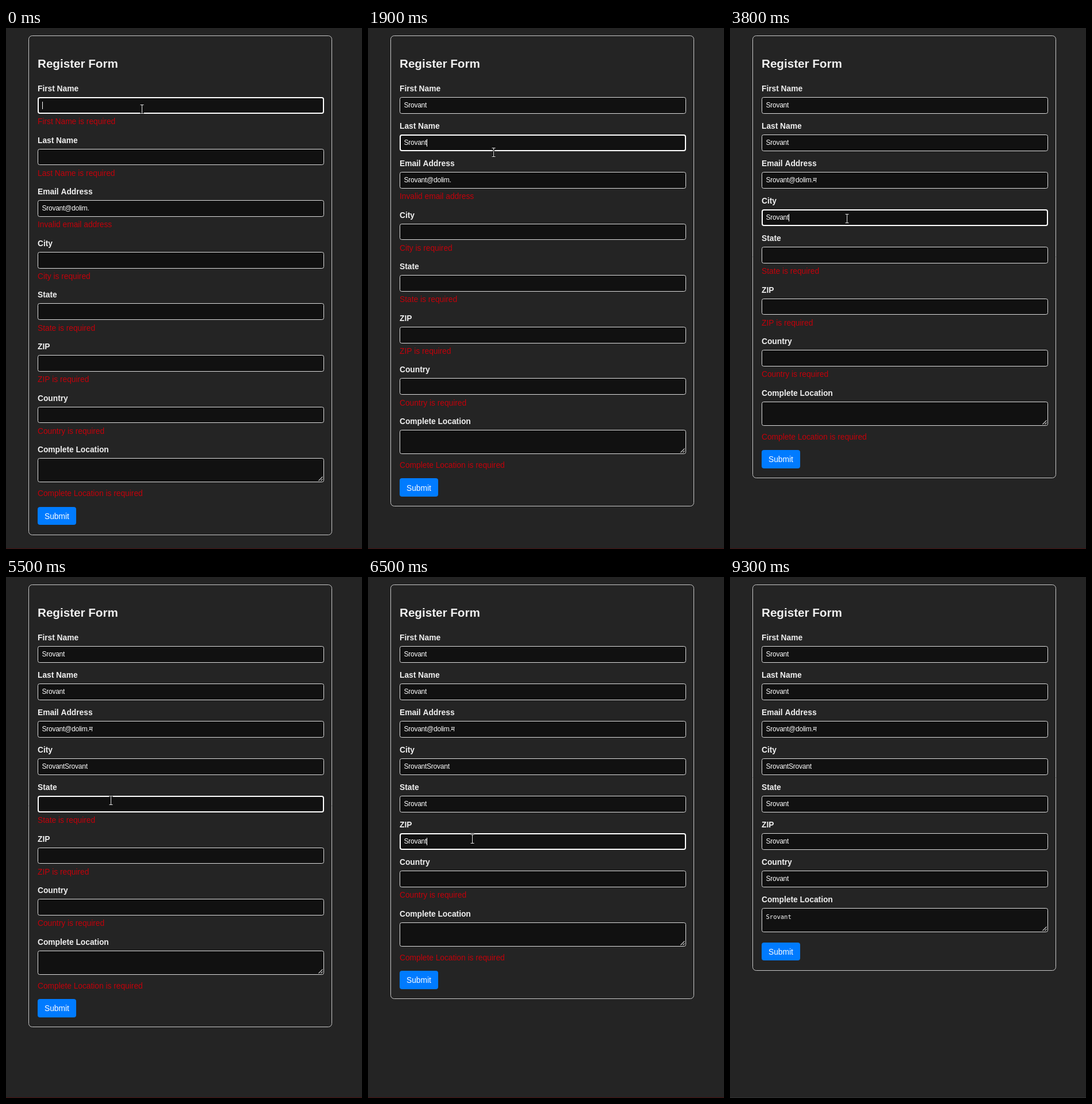
An HTML page with a canvas for the animation above (9400 ms loop, 619 by 905 pixels).

```html
<!DOCTYPE html>
<html lang="en">
<head>
<meta charset="utf-8">
<title>Register Form</title>
<style>
  html, body { margin: 0; width: 100%; height: 100%; overflow: hidden; background: #242424; }
  canvas { display: block; }
</style>
</head>
<body>
<canvas id="stage" width="619" height="905"></canvas>
<script>
const ctx = document.getElementById('stage').getContext('2d');
const LOOP = 9400, ERROR_HEIGHT = 24.62, PITCH = 65;
const SANS = '"Liberation Sans", Arial, "Noto Sans", sans-serif';
const MONO = '"DejaVu Sans Mono", monospace';
const NAME = 'Srovant', MAIL = NAME + '@dolim.';

// focus: time of the click; fills: [time, value] in order
const fields = [
  { label: 'First Name', focus: 0, fills: [[500, NAME]] },
  { label: 'Last Name', focus: 1300, fills: [[1700, NAME]] },
  { label: 'Email Address', focus: 2200, fills: [[2500, MAIL + 'म']],
    initial: MAIL, error: 'Invalid email address' },
  { label: 'City', focus: 3200, fills: [[3600, NAME], [4300, NAME + NAME]] },
  { label: 'State', focus: 4900, fills: [[5700, NAME]] },
  { label: 'ZIP', focus: 6200, fills: [[6400, NAME]] },
  { label: 'Country', focus: 7250, fills: [[7600, NAME]] },
  { label: 'Complete Location', focus: 8150, fills: [[8500, NAME]], area: true }
];
const BLUR = 8900;

// pointer stops: time, x, y
const path = [
  [0, 236, 141], [750, 236, 141], [1100, 220, 207], [1800, 219, 203],
  [2150, 214, 265], [2850, 214, 265], [3150, 205, 330], [4450, 202, 332],
  [4850, 182, 388], [5850, 182, 388], [6150, 181, 455], [6900, 181, 455],
  [7200, 180, 524], [7600, 180, 524], [7850, 180, 591], [8550, 180, 591],
  [8850, 100, 652], [9000, 105, 665], [9250, 130, 925], [LOOP, 130, 925]
];

function pointerAt(t) {
  const i = path.findIndex(stop => stop[0] > t);
  const [t0, x0, y0] = path[i - 1], [t1, x1, y1] = path[i];
  const u = (t - t0) / (t1 - t0), e = u * u * (3 - 2 * u);
  return [Math.round(x0 + (x1 - x0) * e), Math.round(y0 + (y1 - y0) * e)];
}

function text(str, x, y, size, color, weight = '', family = SANS, spacing = 0) {
  ctx.font = `${weight} ${size}px ${family}`;
  ctx.letterSpacing = spacing + 'px';
  ctx.fillStyle = color;
  ctx.fillText(str, x, Math.round(y));
}

function box(x, top, right, bottom, radius, fill, stroke, line = 1) {
  const y = Math.round(top), h = Math.round(bottom) - y, half = line / 2;
  ctx.beginPath();
  ctx.roundRect(x + half, y + half, right - x - line, h - line, radius);
  if (fill) { ctx.fillStyle = fill; ctx.fill(); }
  if (stroke) { ctx.strokeStyle = stroke; ctx.lineWidth = line; ctx.stroke(); }
}

function strokePath(d, color, width) {
  ctx.strokeStyle = color;
  ctx.lineWidth = width;
  ctx.stroke(new Path2D(d));
}

function drawField(f, top, t, focused) {
  const done = f.fills.filter(fill => t >= fill[0]);
  const last = done[done.length - 1];
  const value = last ? last[1] : f.initial || '';
  const bottom = top + (f.area ? 42 : 28.7);
  const baseline = top + (f.area ? 18.6 : 18);

  text(f.label, 55, top - 10.1, 13.76, '#f0f0f0', 'bold');
  box(55, top, 553, bottom, 3, '#111', focused ? '#fff' : '#dedede', focused ? 2 : 1);
  if (f.area) text(value, 62.5, baseline, 10.5, '#fff', '', MONO);
  else text(value, 62.5, baseline, 12, '#fff', '', SANS, -0.25);

  if (focused) {
    const since = t - Math.max(f.focus, last ? last[0] : 0);
    if (since % 1000 < 500) {
      const x = Math.round(62.5 + ctx.measureText(value).width);
      ctx.fillRect(x, Math.round(baseline) - 10, 1, 13);
    }
  }
  if (f.area) {
    const y = Math.round(bottom);
    strokePath(`M543.5 ${y - 2.5}l7-7M547.5 ${y - 2.5}l3-3`, '#c8c8c8', 1.2);
  }
  if (last) return 0;
  text(f.error || f.label + ' is required', 55, top + (f.area ? 66 : 47.1), 13.76, '#c4000a');
  return ERROR_HEIGHT;
}

function drawPointer(t) {
  const [x, y] = pointerAt(t);
  if (t > 8650) {
    const arrow = new Path2D(`M${x} ${y}v15l3.5-3.3 2.3 5.3 2.4-1-2.3-5.2h4.8z`);
    ctx.fillStyle = '#fff';
    ctx.fill(arrow);
    ctx.strokeStyle = '#000';
    ctx.lineWidth = 0.8;
    ctx.stroke(arrow);
    return;
  }
  const beam = `M${x - 2.5} ${y - 7.5}h6M${x + .5} ${y - 7.5}v15M${x - 2.5} ${y + 7.5}h6`;
  strokePath(beam, '#111', 3);
  strokePath(beam, '#e4e4e4', 1);
}

function draw(t) {
  ctx.fillStyle = '#242424';
  ctx.fillRect(0, 0, 619, 905);
  ctx.fillStyle = t < 8500 ? '#4a1111' : '#343434';
  ctx.fillRect(0, 904, 619, 1);

  text('Register Form', 55, 69, 20.64, '#f0f0f0', 'bold');
  const active = t < BLUR ? fields.filter(f => t >= f.focus).pop() : null;
  let top = 120;
  for (const f of fields) top += PITCH + drawField(f, top, t, f === active);

  const button = top - 5.4;
  box(55, button, 122, button + 31.8, 3, '#007bff', '#007bff');
  text('Submit', 67, button + 21.4, 13.76, '#fff');
  box(39, 13, 567, button + 49, 6, null, '#c9c9c9');
  drawPointer(t);
}

function frame() {
  draw(performance.now() % LOOP);
  requestAnimationFrame(frame);
}
frame();
</script>
</body>
</html>
```
